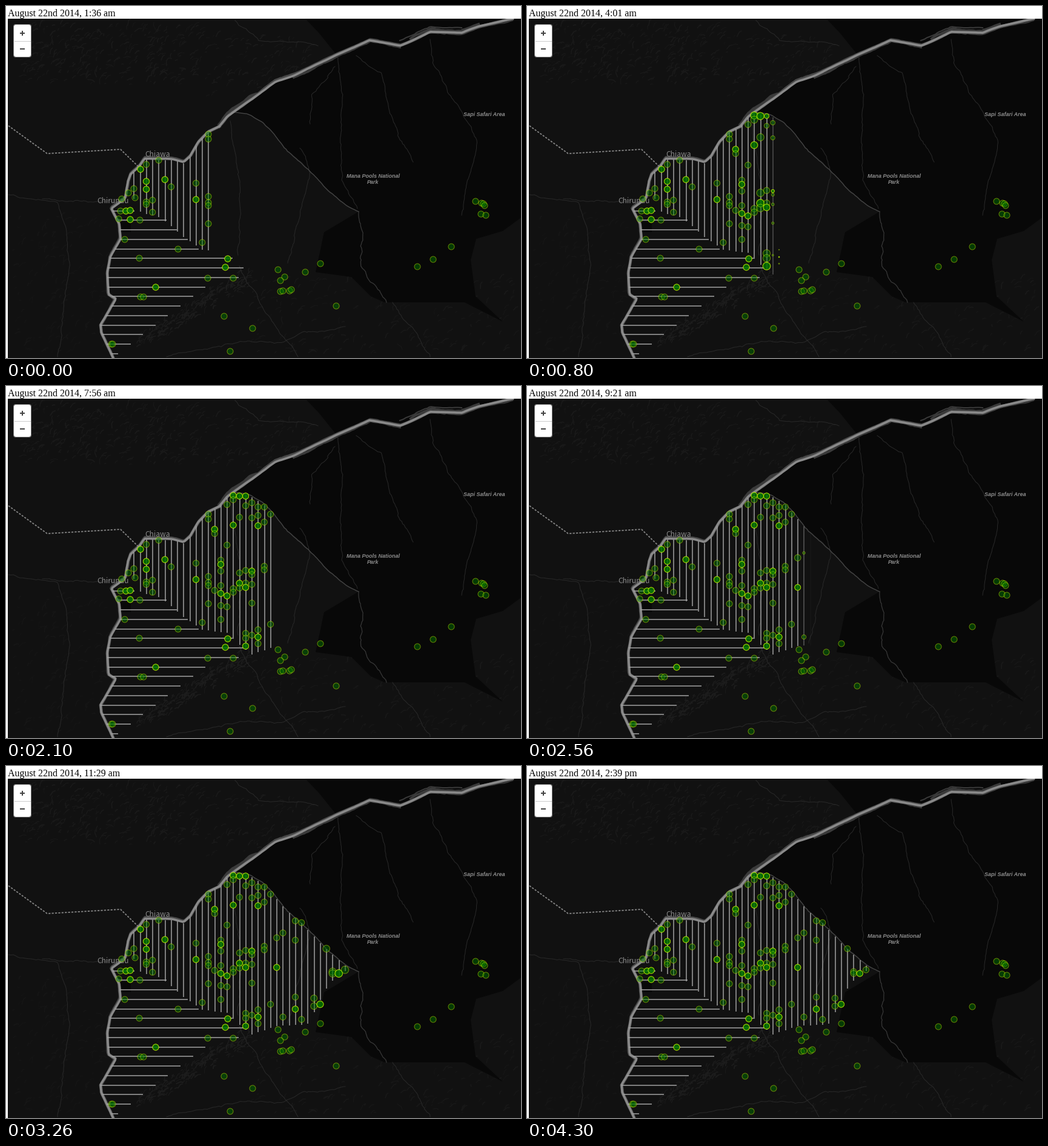
A matplotlib script for the animation above (4320 ms loop, 850x582 px).

```python
import matplotlib.pyplot as plt
import numpy as np
from matplotlib.animation import FuncAnimation
from matplotlib.collections import LineCollection
from matplotlib.patches import FancyBboxPatch, Polygon, Rectangle

W, H, DPI = 850, 582, 100
FRAMES, STEP = 216, 20
PX = 72 / DPI
rng = np.random.default_rng(22)

fig = plt.figure(figsize=(W / DPI, H / DPI), dpi=DPI, facecolor="white")
ax = fig.add_axes([0, 0, 1, 1])
ax.set(xlim=(0, W), ylim=(H, 0))
ax.axis("off")


def meander(pts, amp):
    """Resample a polyline and bend it with a random walk tied at both ends."""
    pts = np.array(pts, float)
    dist = np.r_[0, np.cumsum(np.hypot(*np.diff(pts, axis=0).T))]
    s = np.linspace(0, dist[-1], int(dist[-1] / 4) + 3)
    path = np.c_[np.interp(s, dist, pts[:, 0]), np.interp(s, dist, pts[:, 1])]
    walk = np.cumsum(rng.normal(0, amp, path.shape), axis=0)
    t = np.linspace(0, 1, len(s))[:, None]
    return path + walk - walk[0] * (1 - t) - walk[-1] * t


def trace(pts, color, width, amp=0.0, z=2):
    ax.plot(*meander(pts, amp).T, color=color, lw=width * PX,
            solid_joinstyle="round", zorder=z)


def hills(n, x0, y0, x1, y1, shade="#1a1a1a"):
    """Scatter short slanted strokes as faint relief shading."""
    start = rng.uniform((x0, y0), (x1, y1), (n, 2))
    a = np.radians(rng.normal(-50, 25, n))
    size = rng.uniform(2, 9, n)[:, None]
    mid = start + size * np.c_[np.cos(a), np.sin(a)]
    end = mid + size * 0.6 * np.c_[np.cos(a + 0.6), np.sin(a + 0.6)]
    ax.add_collection(LineCollection(
        np.stack([start, mid, end], axis=1), colors=shade,
        linewidths=rng.uniform(0.5, 1.8, n) * PX, zorder=1))


def label(x, y, s, size, color="#8a8a8a", font="Noto Sans CJK JP", z=3, **kw):
    return ax.text(x, y, s, fontsize=size * PX, color=color, family=font,
                   va="baseline", zorder=z, **kw)


# River from south to north-east, and the road along the park edge
RIVER_WEST = [(177, 582), (157, 540), (156, 527), (174, 496), (181, 484),
              (169, 477), (167, 440), (172, 415), (189, 385), (187, 360),
              (174, 335), (197, 318), (202, 290), (206, 278), (220, 265),
              (229, 252), (275, 253), (293, 258), (304, 248), (317, 225),
              (333, 208), (352, 199)]
RIVER_EAST = [(352, 199), (366, 182), (412, 149), (445, 124), (475, 114),
              (545, 80), (600, 56), (650, 65), (668, 58), (700, 42),
              (752, 44), (780, 34), (836, 21)]
ROAD = [(375, 176), (400, 178), (426, 194), (466, 240), (488, 258),
        (528, 300), (560, 328), (582, 340)]
PARK_EAST = [(525, 374), (511, 440), (570, 448), (602, 480), (625, 490),
             (757, 490), (820, 522), (775, 480), (767, 420), (776, 385),
             (820, 372), (850, 350), (850, 21), (494, 21), (516, 44)]

# Land, relief and park
ax.add_patch(Rectangle((3, 21), W, H, color="#111111", lw=0, zorder=0))
hills(340, 20, 30, 330, 130)
hills(110, 330, 50, 500, 150)
hills(160, 10, 340, 165, 575, "#161616")
hills(200, 400, 450, 840, 575, "#191919")
for k in range(12):
    x, y = 215 + 15 * k, 540 - 9 * k
    hills(18, x, y, x + 24, y + 24, "#1d1d1d")
ax.add_patch(Polygon(RIVER_EAST[5:0:-1] + ROAD + PARK_EAST, color="#080808",
                     lw=0, zorder=1.5))
ax.add_patch(Rectangle((188, 357), 18, 17, color="#080808", lw=0, zorder=1.5))

# Streams and tracks
NORTH = [
    [(548, 85), (552, 130), (556, 290), (580, 335)],
    [(578, 82), (618, 115), (635, 185), (672, 258)],
    [(700, 55), (705, 100), (778, 230), (752, 346)],
    [(502, 195), (505, 150), (543, 100)],
    [(370, 190), (383, 300), (383, 412)],
    [(485, 235), (500, 270), (465, 425)],
    [(378, 24), (425, 58), (515, 66)],
]
SOUTH = [
    [(4, 312), (85, 325), (103, 432), (85, 580)],
    [(60, 319), (185, 325)],
    [(385, 430), (450, 530), (482, 580)],
    [(265, 580), (340, 560), (450, 553), (490, 536), (560, 530)],
    [(638, 490), (700, 580)],
]
for s in NORTH + SOUTH:
    trace(s, "#292929", 1, 0.8)
trace(ROAD, "#444444", 1.4, 0.4)
trace([(582, 340), (580, 430), (628, 490)], "#363636", 1.3, 1.2)

# River: side channels follow it at an offset, then bank and water
for a, b, shift, width in ((0, 3, -3, 5), (4, 6, 4, 4), (5, 8, 3, 4),
                           (7, 11, -8, 2), (8, 12, -4, 4), (9, 13, 3, 2)):
    trace(np.array(RIVER_EAST[a:b]) + (0, shift), "#3a3a3a", width, 0.5, 2.5)
for bank in (RIVER_WEST, RIVER_EAST):
    trace(bank, "#4a4a4a", 5.2, 0.2, 2.6)
    trace(bank, "#8a8a8a", 3.6, 0.1, 2.7)
ax.plot([4, 68, 189, 221], [198, 244, 237, 268], color="#858585", lw=1.8 * PX,
        ls=(0, (1.8, 1.2)), zorder=2.8)

# Place names
label(250, 249, "Chiawa", 12, ha="center")
label(177, 326, "Chirundu", 12, ha="center")
for x, y, name in ((789, 182, "Sapi Safari Area"),
                   (606, 284, "Mana Pools National"), (606, 294, "Park")):
    label(x, y, name, 9, font="Liberation Sans", weight="bold",
          style="italic", ha="center")

# Page margin, zoom buttons and clock
for w, h in ((W, 21), (3, H)):
    ax.add_patch(Rectangle((0, 0), w, h, color="white", lw=0, zorder=8))
for pad, color in ((1, "#777777"), (0, "white")):
    ax.add_patch(FancyBboxPatch((17 - pad, 35 - pad), 20 + 2 * pad, 45 + 2 * pad,
                                boxstyle="round,pad=4,rounding_size=4",
                                fc=color, ec="none", zorder=9))
ax.plot([14, 40], [57.5, 57.5], color="#cccccc", lw=PX, zorder=10)
for xs, ys in (((23, 31), (45, 45)), ((27, 27), (41, 49)), ((23, 31), (71, 71))):
    ax.plot(xs, ys, color="#444444", lw=2 * PX, solid_capstyle="butt", zorder=10)
clock = label(3, 17, "", 16, "black", "Liberation Serif", 10)

# Flight columns run between river or road and the southern limit
BOTTOM = [(211, 318), (222, 341), (253, 349), (263, 356), (294, 382),
          (324, 403), (365, 408), (385, 427), (406, 444), (447, 430),
          (498, 427), (528, 370), (539, 355), (560, 339)]
ROW_END = [(339, 212), (354, 264), (402, 318), (417, 373), (433, 392),
           (449, 384), (464, 330), (575, 185)]
FIRST, SECOND, LAST = 13, 23, 34
SPEED = 47

col_x = 211.5 + 10.25 * np.arange(LAST + 1)
top = np.interp(col_x, *zip(*RIVER_WEST[13:], RIVER_EAST[1], *ROAD)) + 2
bottom = np.interp(col_x, *zip(*BOTTOM))
span = (bottom - top) / SPEED
start = np.full(LAST + 1, -99.0)
for i in range(FIRST, LAST + 1):
    start[i] = {FIRST: 4, SECOND: 117}.get(i, start[i - 1] + span[i - 1])

row_y = 338.7 + 15.75 * np.arange(16)
river_x, river_y = zip(*RIVER_WEST[13::-1])
rows = zip(np.interp(row_y, river_y, river_x), np.interp(row_y, *zip(*ROW_END)), row_y)
ax.add_collection(LineCollection([[(a, y), (b, y)] for a, b, y in rows],
                                 colors="#a4a4a4", linewidths=1.5 * PX, zorder=4))
columns = LineCollection([[(x, a), (x, b)] for x, a, b in zip(col_x, top, bottom)],
                         linewidths=1.5 * PX, zorder=4)
ax.add_collection(columns)

# Sightings; a negative y marks several at the same place
EAST = [(775, 323), (785, 326), (788, 327), (790, 330), (784, 344), (792, 346),
        (735, 398), (705, 419), (679, 431), (519, 426), (494, 440), (449, 436),
        (460, 448), (453, 454), (453, 472), (457, 471), (468, 471), (471, 469),
        (545, 496), (407, 533), (360, 513), (370, 571)]
WEST = [(174, 559), (176, 559), (222, 481), (227, 481), (247, -465), (333, 450),
        (375, 450), (362, -432), (366, -418), (220, 417), (284, 402),
        (196, 386), (186, 352), (205, -353), (221, 354), (189, 339),
        (198, -339), (205, -338), (191, 319), (202, 309), (211, 302),
        (213, 317), (222, -270)]
EARLY = {
    2: (262, -290, -303, 324, 328), 3: (321, 341), 4: (255,), 5: (-287,),
    6: (299,), 10: (293, -320), 11: (391,),
    12: (212, 220, 315, 325, 330, 360),
    13: (-237, 244, 338), 14: (288, -295, 306, 330, -343, 363, 386),
    15: (196, 263, -347, 365), 16: (-181, 188, -230, 335, 341),
}
LATE = {
    17: (-182, 217, 309, -326, 334),
    18: (-182, 198, 305, 326, -333, 409, 417, -430),
    19: (193, 218, -306, 312, 328, 359, 412),
    20: (200, 214, -231, 403, -415, 426), 21: (200, 225, 298, 304),
    22: (212, 394), 23: (-333, 284), 24: (276, 415),
    26: (256, 288, 382, -402), 27: (259, 419), 29: (384, 397), 30: (-394,),
    31: (302,), 32: (340, 343), 33: (-343,), 34: (337,),
}

dots = []


def add_dot(x, y, born):
    dots.extend([(x, abs(y), born)] * (3 if y < 0 else 1))


for x, y in EAST + WEST:
    add_dot(x, y, -99)
for i, ys in (EARLY | LATE).items():
    for y in ys:
        flown = abs(y) - top[i] if i % 2 else bottom[i] - abs(y)
        add_dot(col_x[i] - 0.5, y, start[i] + flown / SPEED)
dots = np.array(dots)
marks = ax.scatter([], [], facecolors=[(0, 0.45, 0, 0.48)],
                   edgecolors=[(0.85, 1, 0, 0.42)], linewidths=1.1 * PX, zorder=6)


def draw(n):
    minute = int(np.interp(n, [0, 40, 67, 105, 146, 163, 215],
                           [96, 241, 338, 476, 627, 689, 879]) + 0.5)
    hour = minute // 60
    clock.set_text(f"August 22nd 2014, {(hour - 1) % 12 + 1}:{minute % 60:02d} "
                   f"{'am' if hour < 12 else 'pm'}")

    shade = np.full((LAST + 1, 4), 0.64)
    shade[:, 3] = np.clip((n - start - span / 2) / 9, 0, 1)
    columns.set_color(shade)

    # Dots swell past their final size, then settle
    age = n - dots[:, 2]
    live = age > 0
    radius = np.interp(age[live], [0, 9, 12, 15, 23], [0.4, 5, 6.2, 6.2, 5])
    marks.set_offsets(dots[live, :2])
    marks.set_sizes((2 * radius * PX) ** 2)
    return clock, columns, marks


anim = FuncAnimation(fig, draw, frames=FRAMES, interval=STEP, repeat=True,
                     repeat_delay=0, blit=False)
plt.show()
```
